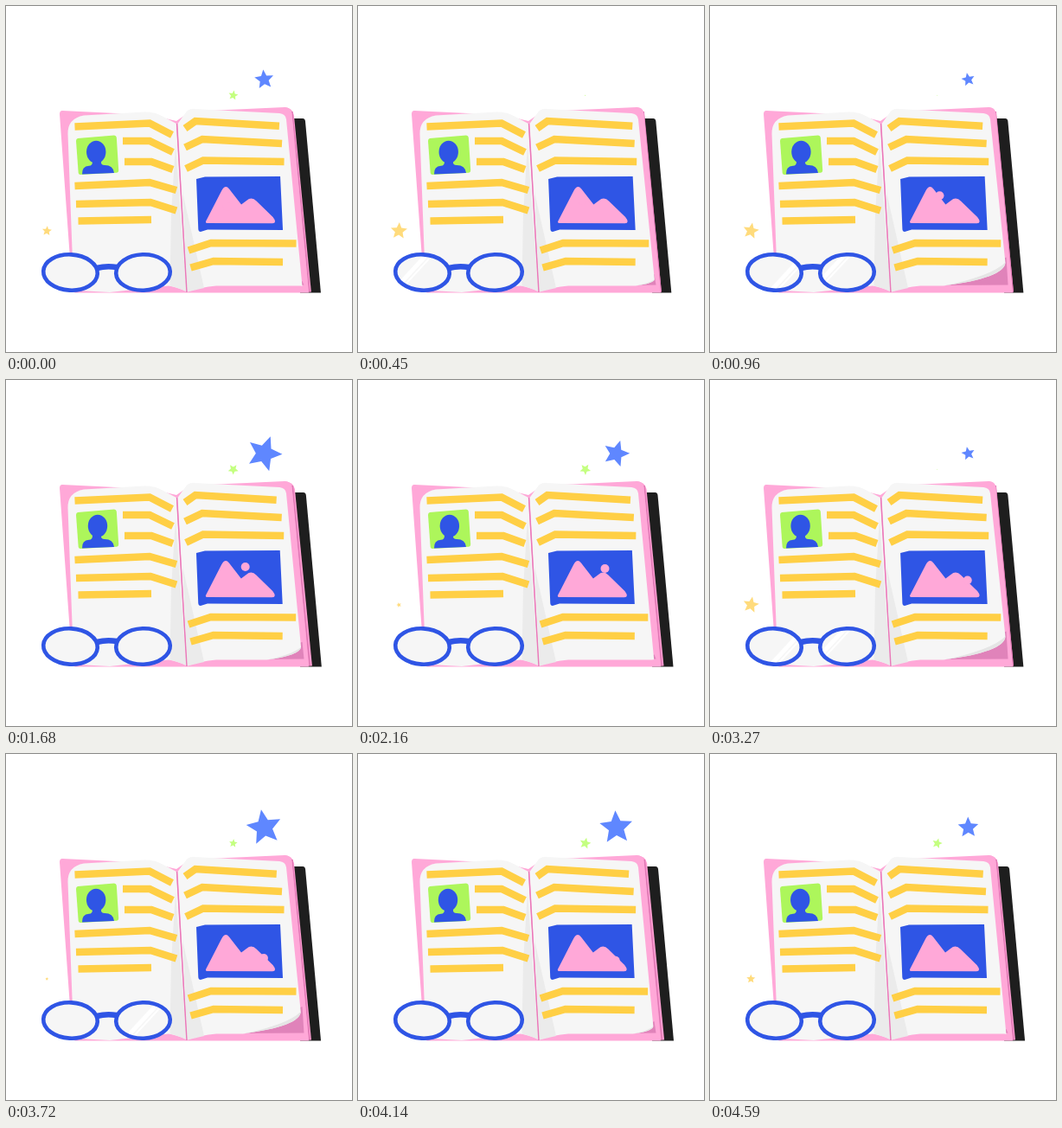
Write an HTML page that moves like this. It is 400 px wide and 400 px high and loops after 4.62 s.

```html
<!DOCTYPE html>
<html lang="en">
<head>
<meta charset="utf-8">
<title>Open book</title>
<style>
  html, body { margin: 0; width: 100%; height: 100%; overflow: hidden; background: #fff; }
  svg { display: block; width: 100vw; height: 100vh; }
  .line { fill: none; stroke: #ffcf45; stroke-width: 8.5; stroke-linejoin: miter; }
  .lens { fill: none; stroke: #2f55e5; stroke-width: 4.6; }
</style>
</head>
<body>
<svg viewBox="0 0 400 400" xmlns="http://www.w3.org/2000/svg">
  <defs>
    <clipPath id="lensClip">
      <ellipse cx="74.5" cy="308" rx="30" ry="20"/>
      <ellipse cx="158.5" cy="308" rx="30" ry="20"/>
    </clipPath>
  </defs>

  <path id="block" fill="#1e1e1e"/>
  <path id="edge" fill="#ff9fd3"/>
  <path id="rim" fill="none" stroke="#df78b4" stroke-width="1.6"/>
  <path id="cover" fill="#ffa8d8"/>

  <path fill="#f6f6f6" d="M78 322 L71.5 148 Q71 130 90 126.500 L160 122.500 Q170 122 178 126 L197 136 L208.500 330 Q198 325 188 323.500 L120 331 L84 329 Q78 327 78 322 Z"/>
  <path fill="#ebebeb" d="M191 240 L196 160 L208.500 330 Q198 325 189.500 323.500 Z"/>
  <g id="leftText"></g>
  <path fill="#adf65b" d="M83 153 L125 149.500 Q127.500 149.500 127.800 152 L130.200 190 Q130.200 192.500 128 192.800 L86 195 Q84 195 83.700 193 L81 156 Q81 153.500 83 153 Z"/>
  <path fill="#2f55e5" d="M88 194.500 Q87.500 185.500 96 184.800 Q100 184.500 100 180 L110 180 Q109.500 184 114 184 Q124 184 125 193 Z"/>
  <ellipse id="head" cy="168.700" rx="11.200" ry="13" fill="#2f55e5"/>

  <path id="under" fill="#e083ba"/>
  <path id="page" fill="#f6f6f6"/>
  <path fill="#ebebeb" d="M204 215 L229 326 L209.500 330.500 Z"/>
  <path id="flap" fill="#e5e5e5"/>
  <path d="M197.500 136 L209 331" stroke="#e878b8" stroke-width="1.400"/>
  <g id="rightText">
    <path fill="#2f55e5" d="M220 200 L230 197.500 L317 197 L320 259 L233 258.500 L225 261 Q222.500 261 222.300 258 Z"/>
    <path fill="#ffa8d8" d="M231 249 L249.500 213 Q253.500 206 258 211.500 L272 229.500 L278 225 Q284 220 289.500 225.500 L308.500 244 Q314 251 308 251.200 L233 251 Q230.500 251 231 249 Z"/>
    <circle id="sun" r="5" fill="#ffa8d8"/>
  </g>

  <ellipse cx="74.500" cy="308" rx="31" ry="21" fill="#f6f6f6"/>
  <ellipse cx="158.500" cy="308" rx="31" ry="21" fill="#f6f6f6"/>
  <g clip-path="url(#lensClip)">
    <g id="glint" stroke="#fff">
      <path stroke-width="5" d="M65 335 L115 281 M112 335 L162 281"/>
      <path stroke-width="2" d="M72 335 L122 281 M119 335 L169 281"/>
    </g>
  </g>
  <ellipse class="lens" cx="74.500" cy="308" rx="31.300" ry="20.700" transform="rotate(3 74.500 308)"/>
  <ellipse class="lens" cx="158.500" cy="308" rx="31.300" ry="20.700" transform="rotate(-2 158.500 308)"/>
  <path d="M105 303 Q116 300 128 302" fill="none" stroke="#2f55e5" stroke-width="6.500"/>

  <path id="blue" fill="#5f87ff"/>
  <path id="green" fill="#c4ff80"/>
  <path id="gold" fill="#ffdb7c"/>
</svg>
<script>
const LOOP = 4620, HALF = 2310, TAU = Math.PI * 2;
const el = id => document.getElementById(id);
const set = (id, name, value) => el(id).setAttribute(name, value);

function addLine(parent, d) {
  const p = document.createElementNS('http://www.w3.org/2000/svg', 'path');
  p.setAttribute('class', 'line');
  p.setAttribute('d', d);
  el(parent).appendChild(p);
  return p;
}
['M79.500 139.500 L166 135.500 L192 149', 'M135 156 L166 156 L193 169', 'M137 180 L168 180 L193 189',
 'M79.500 208 L166 204 L197 213', 'M81 229 L167 227 L197 236.500', 'M83.500 248.500 L168 247'
].forEach(d => addLine('leftText', d));
const topLine = addLine('rightText', '');
['M207 163.500 L227 154 L319 159', 'M208 188 L228 178.500 L321.500 180',
 'M211 282.500 L237 274 L335.500 274.500', 'M213.500 302.500 L240 295 L320 296'
].forEach(d => addLine('rightText', d));

// Smooth curve through [time, value] keys, repeating every `span` ms if it is given.
function curve(keys, span) {
  const n = keys.length;
  const at = i => {
    if (!span) return keys[Math.max(0, Math.min(n - 1, i))];
    const k = keys[(i + n) % n];
    return [k[0] + span * Math.floor(i / n), k[1]];
  };
  const slope = i => {
    const a = at(i - 1), b = at(i + 1);
    return (b[1] - a[1]) / (b[0] - a[0]);
  };
  return t => {
    let i = 0;
    while (i < n - 1 && keys[i + 1][0] <= t) i++;
    const a = at(i), b = at(i + 1), h = b[0] - a[0];
    if (!h) return a[1];
    const u = (t - a[0]) / h, u2 = u * u, u3 = u2 * u;
    return (2 * u3 - 3 * u2 + 1) * a[1] + (u3 - 2 * u2 + u) * h * slope(i)
      + (3 * u2 - 2 * u3) * b[1] + (u3 - u2) * h * slope(i + 1);
  };
}

const stars = [
  { id: 'blue', x: 298.5, y: 85, tilt: -6, turn: -1, size: curve([[0, 11.5], [280, 3], [450, 0], [700, 0.8],
    [960, 8], [1080, 12], [1410, 21], [1550, 22.3], [1680, 21], [2040, 18], [2160, 15.7]], HALF) },
  { id: 'green', x: 262.7, y: 103.3, tilt: 10, turn: -1, size: curve([[0, 5.8], [250, 3], [450, 0.8], [700, 0],
    [960, 0.6], [1410, 5], [1680, 6.3], [1950, 6.9], [2160, 6.6]], HALF) },
  { id: 'gold', x: 47.3, y: 260, tilt: 5, turn: 1, size: curve([[0, 5.8], [240, 8.5], [450, 10], [700, 10.6],
    [960, 9.6], [1200, 6], [1410, 2], [1600, 0], [1850, 0], [2160, 3]], HALF) }
];
const sunAngle = curve([[0, -75], [960, -32], [1680, 1], [2160, 25], [2760, 56], [3720, 86], [LOOP, 100]]);

function starPath(x, y, r, deg) {
  if (r < 0.2) return '';
  let d = '';
  for (let i = 0; i < 10; i++) {
    const a = deg * TAU / 360 + i * TAU / 10, q = i % 2 ? r * 0.46 : r;
    d += (i ? 'L' : 'M') + (x + q * Math.sin(a)).toFixed(2) + ' ' + (y - q * Math.cos(a)).toFixed(2);
  }
  return d + 'Z';
}

const wave = (t, peak, span) => Math.cos(TAU * (t - peak) / span);

function drawCover(s) {
  const k = 3.6 * s, b = 362 + 3 * s;
  set('block', 'd', `M325 130 L${b - 21} 130 Q${b - 18.5} 130 ${b - 18} 133 L${b} 331.5 L340 331.5 Z`);
  set('edge', 'd', `M322 117 Q${329 + k} 118 ${330.5 + k} 126 L${350.5 + k} 330.5 L335 330.5 Z`);
  set('rim', 'd', `M${330 + k * 0.35} 122 L${350 + k * 0.35} 330.5`);
  set('cover', 'd', 'M65 121 L168 126 L197 133 L213 122 L322 117 Q329.500 117 330.500 124'
    + ' L350 331.500 L80 331.500 Q77 331 76.500 327 L62 125 Q62 121 65 121 Z');
}

function drawPage(c, s) {
  const x = 342 + 1.5 * (1 - s) - 2 * c, y = 324 - 30 * c, left = 341 - 78 * c;
  const cx = x - 1, cy = 323.5 - 10 * c;
  set('under', 'd', `M${left - 4} 323 L344.500 322.500 L${342.5} ${y - 6} Z`);
  set('page', 'd', 'M198.500 136 L208 123 Q211 118.500 217 119 L316 124 Q323 124.500 324 131'
    + ` L${x} ${y} Q${cx} ${cy} ${left} 323.500 L243 323.500 Q225 325 209.500 330.500 Z`);
  set('flap', 'd', c < 0.05 ? '' : `M${x} ${y} Q${cx} ${cy} ${left} 323.500`
    + ` Q${cx - 17 * c} ${cy - 2 * c} ${x} ${y} Z`);
}

function draw(t) {
  const h = t % HALF;
  const s = (1 + wave(h, 1850, HALF)) / 2;
  const curl = Math.pow((1 - wave(h, 0, HALF)) / 2, 1.2);
  drawCover(s);
  drawPage(curl, s);

  const k = 1 + 0.01 * (0.7 - s);
  set('rightText', 'transform', `translate(${205 * (1 - k)} 0) scale(${k} 1)`);
  const end = 314.700 + 2 * wave(h, 350, HALF);
  topLine.setAttribute('d', `M207 141.500 L219 133 L${end} 138.800`);

  const a = sunAngle(t) * TAU / 360;
  set('sun', 'cx', 276.5 + 21.5 * Math.sin(a));
  set('sun', 'cy', 237.5 - 21.5 * Math.cos(a));
  set('head', 'cx', 105 + wave(t, 1800, LOOP));
  set('glint', 'transform', `translate(${(h - 960) * 0.15} 0)`);

  for (const p of stars) {
    const deg = p.tilt + p.turn * 360 * h / HALF;
    set(p.id, 'd', starPath(p.x, p.y, p.size(h), deg));
  }
}

function tick() {
  draw(Math.floor(performance.now() % LOOP / 30) * 30);
  requestAnimationFrame(tick);
}
tick();
</script>
</body>
</html>
```
